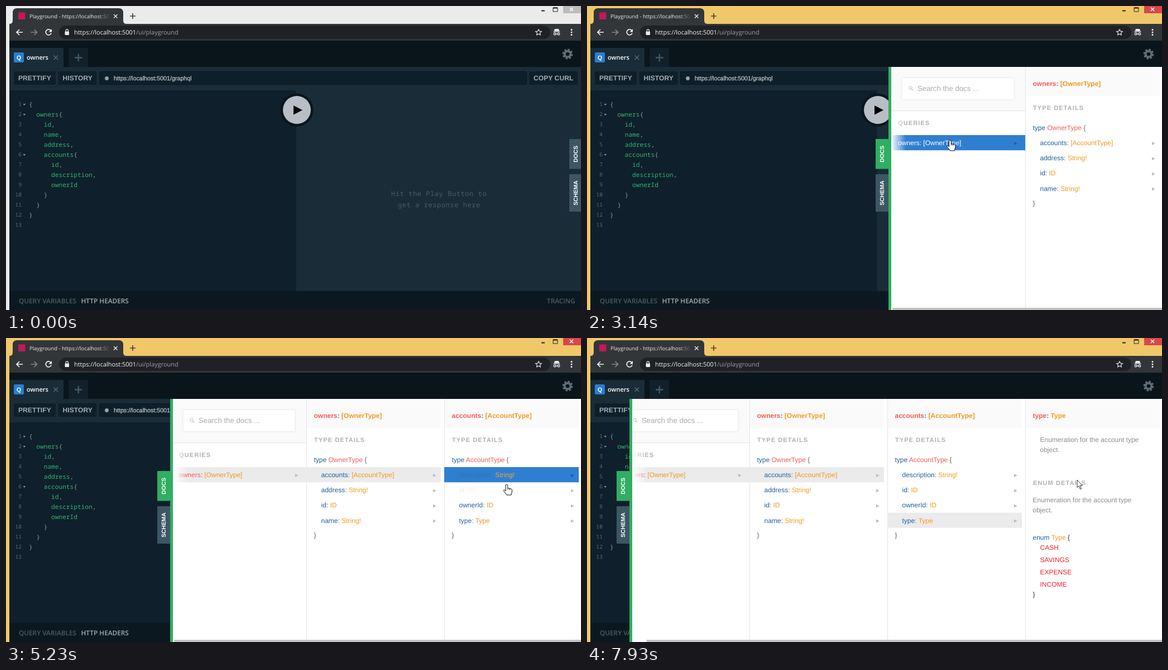
Write an HTML page that moves like this. It is 1030 px wide and 544 px high and loops after 8000 ms.

```html
<!DOCTYPE html>
<html lang="en">
<head>
<meta charset="utf-8">
<title>Playground</title>
<style>
  html, body { margin: 0; width: 100%; height: 100%; overflow: hidden; background: #0f1f2b; }
  svg { display: block; }
  text { font: 12px "Liberation Sans", Arial, sans-serif; white-space: pre; text-rendering: geometricPrecision; }
  .ui { font-family: "Open Sans", sans-serif; }
  .semi { font-weight: 600; }
  .bold { font-weight: 700; }
  .mono { font-family: "Noto Sans Mono", monospace; }
  .line { fill: none; stroke: #fff; stroke-width: 1.7; }
  .row { --w: 0%; }
  .row tspan { fill: color-mix(in srgb, #fff var(--w), var(--c)); }
</style>
</head>
<body>
<svg id="stage" width="1030" height="544" viewBox="0 0 1030 544"></svg>
<script>
const RED = '#f25c54', BLUE = '#1f61a0', ORANGE = '#f5981d', GRAY = '#666', GREEN = '#30ae62';
const OPEN_DOCS = 1600, OPEN_ACCOUNTS = 4680, OPEN_TYPE = 6610;

const rect = (x, y, w, h, fill, more = '') =>
  `<rect x="${x}" y="${y}" width="${w}" height="${h}" fill="${fill}" ${more}/>`;
const text = (x, y, s, fill, size = 12, cls = '', style = '') =>
  `<text x="${x}" y="${y}" fill="${fill}" class="${cls}" style="font-size:${size}px;${style}">${s}</text>`;
const path = (d, more = '') => `<path d="${d}" ${more}/>`;
const line = (d, color, width = 1.7) => path(d, `class="line" style="stroke:${color};stroke-width:${width}"`);
const span = (s, color) => `<tspan style="--c:${color}" fill="${color}">${s}</tspan>`;
const field = (name, type, color) => span(name, color) + span(': ', GRAY) + span(type, ORANGE);

function browser() {
  return rect(0, 0, 1030, 544, '#ebebeb', 'id="frame"') +
    rect(998, 0, 32, 13, '#bcbcbc', 'id="close"') +
    line('M1010 3l6 6m0-6l-6 6', '#fff', 1.5) + line('M959 8.5h6', '#222', 2) +
    path('M980 3h8v7h-8z', 'fill="none" stroke="#222"') + line('M980 3.5h8', '#222', 2) +
    path('M6 32Q12 32 12 26V12Q12 4 20 4H202Q210 4 210 12V26Q210 32 216 32Z', 'fill="#323639"') +
    rect(6, 32, 1024, 30, '#323639') + rect(22, 11.5, 12.5, 12.5, '#c2185b') +
    text(42, 21.5, 'Playground - https://localhost:50', '#e8eaed', 9.45, 'ui') +
    rect(165, 8, 22, 20, 'url(#tabFade)') +
    line('M193 15l6.5 6.5m0-6.5l-6.5 6.5', '#e8eaed', 1.4) + line('M222 18h10m-5-5v10', '#444', 1.7) +
    line('M30 47H19.500M24 42l-5 5 5 5', '#f1f3f4') + line('M44.500 47H55M50.500 42l5 5-5 5', '#85888c') +
    line('M80 43.500A5 5 0 1 0 81 48.500', '#f1f3f4') + path('M82 41v5.500h-5.500z', 'fill="#f1f3f4"') +
    rect(95, 35, 880, 24, '#202124', 'rx="12"') +
    rect(105.5, 45.5, 7.5, 6.5, '#e8eaed', 'rx="1"') + line('M107 46v-2a2.200 2.200 0 0 1 4.400 0v2', '#e8eaed', 1.2) +
    text(122, 51, 'https://localhost:5001<tspan fill="#9aa0a6">/ui/playground</tspan>', '#f1f3f4', 10.95, 'ui') +
    line('M954 41.800l1.600 3.400 3.700.400-2.800 2.500.800 3.700-3.300-1.900-3.300 1.900.800-3.700-2.800-2.500 3.700-.400z', '#dfe1e5', 1.2) +
    path('M983 41h7l1.500 4h-10zM980.500 45.500h12v1.200h-12z', 'fill="#e8eaed"') +
    line('M988 50h-3M984.800 50a1.800 1.800 0 1 1-3.600 0 1.800 1.800 0 1 1 3.600 0M991.800 50a1.800 1.800 0 1 1-3.600 0 1.800 1.800 0 1 1 3.600 0', '#e8eaed', 1.3) +
    [42.5, 47, 51.5].map(y => `<circle cx="1013" cy="${y}" r="1.5" fill="#f1f3f4"/>`).join('');
}

function button(x, w, label) {
  return rect(x, 117, w, 24, '#0f1f2a', 'rx="2"') +
    text(x + 8, 133, label, '#a3adb3', 12, 'bold', 'letter-spacing:.1px');
}

function editor() {
  const code = ['{', '  owners{', '    id,', '    name,', '    address,', '    accounts{', '      id,',
    '      description,', '      ownerId', '    }', '  }', '}', ''];
  const lines = code.map((s, i) => {
    const y = 180 + 18 * i;
    const colored = s.replace(/[{},]/g, '<tspan fill="#8a979f">$&</tspan>');
    return text(28, y - 1, i + 1, '#5a6a75', 9.6, 'mono', 'text-anchor:end') +
      (/owners|accounts|^{/.test(s) ? path(`M30.500 ${y - 5}h4.600l-2.300 3z`, 'fill="#8a979f"') : '') +
      text(41, y, colored, '#2bb673', 11.15, 'mono');
  }).join('');
  return rect(6, 62, 1024, 47, '#0a151b') + rect(6, 75, 97, 34, '#1a2c38') + rect(112, 75, 35, 34, '#11202a') +
    rect(14, 83, 18, 18, '#2a7ed3', 'rx="2"') + text(19, 96, 'Q', '#fff', 10.5, 'bold') +
    text(37, 96, 'owners', '#fff', 11, 'ui semi') +
    line('M85.500 88.500l7.500 7.500m0-7.500l-7.500 7.500', '#5c6a73', 1.4) + line('M123 92.500h13.500m-6.750-6.750v13.500', '#465862', 2.4) +
    '<g fill="none" stroke="#5f6c74"><circle cx="1006" cy="86" r="5.300" stroke-width="4"/>' +
    '<circle cx="1006" cy="86" r="8" stroke-width="3" stroke-dasharray="3.500 2.783"/></g>' +
    rect(6, 109, 1024, 42, '#1a2c38') + button(14, 75, 'PRETTIFY') + button(93.5, 69, 'HISTORY') +
    rect(167.5, 117.5, 765, 23, '#0f1f2a', 'rx="2" stroke="#0a161e"') + button(937, 87, 'COPY CURL') +
    '<circle id="pulse" cx="180.500" cy="129.500" fill="#97a3aa"/><circle cx="180.500" cy="129.500" r="3.400" fill="#97a3aa"/>' +
    text(193, 133, 'https://localhost:5001/graphql', '#b4bcc1', 10.7, '', 'stroke:#b4bcc1;stroke-width:.3px') +
    rect(6, 151, 514, 359, '#0f1f2b') + rect(519.5, 151, 511, 359, '#1a2c38') + lines +
    text(690, 340, 'Hit the Play Button to', '#4a5b66', 12, 'mono', 'letter-spacing:.58px') +
    text(702, 360, 'get a response here', '#4a5b66', 12, 'mono', 'letter-spacing:.58px') +
    rect(6, 510, 1024, 34, '#0b1820') +
    text(23, 532, 'QUERY VARIABLES', '#4d5b64', 11.8, 'ui semi') +
    text(134.5, 532, 'HTTP HEADERS', '#a3acb1', 11.8, 'ui semi') +
    text(969, 532, 'TRACING', '#4d5b64', 11.8, 'ui semi') +
    '<circle cx="521" cy="186" r="29.500" fill="#0a151c"/><circle cx="521" cy="186" r="25" fill="#b8bec5"/>' +
    path('M515 178v16.500l16-8.250z', 'fill="#000"');
}

const label = (x, y, s) => text(x, y, s, '#b0b0b0', 11, 'bold', 'letter-spacing:1.1px');

function row(i, name, type, inset = 26.5, color = BLUE, width = 241) {
  const y = 231 + 27.2 * i;
  return `<g class="row" data-name="${name}">` + rect(0, y, width, 27.2, 'none') +
    text(inset, y + 18, field(name, type, color), GRAY) +
    path(`M233 ${y + 12}l5.500 3-5.500 3z`, 'fill="#bcbcbc" transform="translate(-6)"') + '</g>';
}

const header = (name, type) => rect(0, 109, 241, 52, '#fafafa') + rect(0, 109, 1, 435, '#e4e4e4') +
  text(13.5, 143, field(name, type, RED), GRAY, 12, 'bold');

function typeColumn(name, type, typeName, fields) {
  return header(name, type) + label(14, 186, 'TYPE DETAILS') +
    text(13.5, 221.5, span('type ', BLUE) + span(typeName, RED) + ' {', GRAY) +
    fields.map(([n, t], i) => row(i, n, t)).join('') + text(13.5, 357, '}', GRAY);
}

const columns = [
  rect(0, 109, 247, 78, '#fafafa') + rect(0, 187, 247, 1, '#e2e2e2') +
    rect(26.5, 129, 200, 38, '#fff', 'style="filter:drop-shadow(0 0 1.5px #0002)"') +
    '<circle cx="41.500" cy="146.500" r="2.600" fill="none" stroke="#bbb"/>' + line('M43.500 148.500l2.500 2.500', '#bbb', 1.2) +
    text(54, 152, 'Search the docs ...', '#aaa', 13.2) + label(19, 213, 'QUERIES') +
    row(0, 'owners', '[OwnerType]', 19, RED, 247),
  typeColumn('owners', '[OwnerType]', 'OwnerType',
    [['accounts', '[AccountType]'], ['address', 'String!'], ['id', 'ID'], ['name', 'String!']]),
  typeColumn('accounts', '[AccountType]', 'AccountType',
    [['description', 'String!'], ['id', 'ID'], ['ownerId', 'ID'], ['type', 'Type']]),
  header('type', 'Type') +
    [[26.5, 186], [13.5, 294]].map(([x, y]) => text(x, y, 'Enumeration for the account type', '#8c8c8c') +
      text(x, y + 17.5, 'object.', '#8c8c8c')).join('') +
    label(14, 263, 'ENUM DETAILS') +
    text(13.5, 361, span('enum ', BLUE) + span('Type', ORANGE) + ' {', '#333') +
    ['CASH', 'SAVINGS', 'EXPENSE', 'INCOME'].map((s, i) => text(26.5, 378.5 + 22.1 * i, s, '#e8242c')).join('') +
    text(13.5, 463, '}', '#333')
];

const sideTab = (y, h, s, id) => rect(-23, y, 23, h, '#3d5664', `id="${id}"`) +
  `<g transform="translate(-8 ${y + h / 2}) rotate(-90)">` + text(0, 0, s, '#fff', 10.3, 'bold', 'text-anchor:middle') + '</g>';

const stage = document.getElementById('stage');
stage.innerHTML = `<defs>
  <linearGradient id="tabFade"><stop stop-color="#323639" stop-opacity="0"/><stop offset="1" stop-color="#323639"/></linearGradient>
  <linearGradient id="edgeFade"><stop stop-color="#fff"/><stop offset="1" stop-color="#fff" stop-opacity="0"/></linearGradient>
  <clipPath id="panelClip"><rect id="clip" y="109" width="1030" height="435"/></clipPath></defs>` +
  browser() + editor() +
  '<g id="panel" clip-path="url(#panelClip)">' + rect(0, 109, 1030, 435, '#fff') +
  columns.map(c => `<g class="column">${c}</g>`).join('') +
  rect(0, 188, 26, 356, 'url(#edgeFade)', 'id="edge"') + rect(0, 540, 1030, 4, '#c2c2c2', 'id="bar"') + '</g>' +
  '<g id="side">' + sideTab(238, 53.5, 'DOCS', 'docs') + sideTab(301, 67, 'SCHEMA', 'schema') + rect(0, 109, 5, 435, GREEN) + '</g>' +
  '<g id="cursor"><circle id="click" r="10" fill="#b4b41a" fill-opacity=".92"/><g stroke="#111" stroke-linejoin="round" fill="#fff">' +
  path('M-1.800 1Q0-1 1.800 1V6.500L8 8Q10 9 9.600 12L8 19H0L-5.500 11.500Q-5.500 9-3.600 10L-1.800 12ZM2 6.500v3M5 7.300v2.500', 'id="hand"') +
  path('M0 0V13.500L3 10.700 5.500 16.500 7.600 15.600 5.200 10H9.300Z', 'id="arrow" stroke-width=".9"') + '</g></g>';

const $ = Object.fromEntries([...stage.querySelectorAll('[id]')].map(e => [e.id, e]));
const columnNodes = [...stage.querySelectorAll('.column')];
const show = (node, on) => node.setAttribute('visibility', on ? 'visible' : 'hidden');
const move = (node, x, y = 0) => node.setAttribute('transform', `translate(${x} ${y})`);
const within = (t, a, b) => t >= a && t < b;

// time, x, y of the pointer tip
const route = [[200, 935, 548], [980, 995, 264], [1360, 1018, 266], [1980, 1018, 266], [2450, 874, 257],
  [2760, 872, 243], [3150, 650, 240], [3380, 750, 214], [3610, 868, 242], [3910, 878, 256], [4450, 904, 255],
  [4830, 897, 262], [5230, 897, 262], [5400, 899, 252], [5840, 882, 333], [6000, 880, 325], [6690, 878, 324],
  [7390, 878, 324], [7650, 812, 298], [7930, 878, 254], [8000, 878, 254]];
// start, end, column and field under the pointer
const hovers = [[OPEN_DOCS, 2500, 1, 'address'], [2500, 2900, 1, 'accounts'], [3020, 3320, 0, 'owners'],
  [3500, OPEN_ACCOUNTS, 1, 'accounts'], [OPEN_ACCOUNTS, 5220, 2, 'id'], [5220, 5500, 2, 'description'],
  [5500, 5600, 2, 'id'], [5600, 5700, 2, 'ownerId'], [5700, OPEN_TYPE, 2, 'type']];
const selected = { 0: ['owners', OPEN_DOCS], 1: ['accounts', OPEN_ACCOUNTS], 2: ['type', 6770] };
const clicks = [[1520, OPEN_DOCS], [4530, OPEN_ACCOUNTS], [6450, OPEN_TYPE]];

function pointer(t) {
  const i = Math.max(1, route.findIndex(p => p[0] > t));
  const [a, b] = [route[i - 1], route[i]];
  const u = Math.max(0, (t - a[0]) / (b[0] - a[0])), e = u * u * (3 - 2 * u);
  return [a[1] + (b[1] - a[1]) * e, a[2] + (b[2] - a[2]) * e];
}

function drawRow(node, column, t) {
  const name = node.dataset.name;
  let blue = false, white = 0;
  for (const [start, end, c, field] of hovers) {
    if (c !== column || field !== name) continue;
    if (within(t, start, end)) { blue = true; white = Math.min(1, (t - start) / 100); }
    else if (t >= end) white = Math.max(white, 1 - (t - end) / 100);
  }
  const [pick, since] = selected[column];
  const gray = pick === name && t >= since;
  node.style.setProperty('--w', Math.max(0, white) * 100 + '%');
  node.firstChild.setAttribute('fill', blue ? '#2f7fd0' : gray ? '#ebebeb' : 'none');
  node.lastChild.setAttribute('fill', blue ? '#1f5f9f' : '#bcbcbc');
}

function draw(t) {
  const active = t >= 1520, open = t >= OPEN_DOCS;
  $.frame.setAttribute('fill', active ? '#f0c869' : '#ebebeb');
  $.close.setAttribute('fill', active ? '#d9474b' : '#bcbcbc');

  const p = Math.min(1, ((t + 1750) % 2000) / 550);
  $.pulse.setAttribute('r', 3.5 + 5 * (1 - (1 - p) ** 2));
  $.pulse.setAttribute('opacity', .7 * (1 - p));

  const count = t < OPEN_ACCOUNTS ? 2 : t < OPEN_TYPE ? 3 : 4;
  const left = open ? [545, 299, 81][count - 2] : 1037;
  $.clip.setAttribute('x', left);
  $.edge.setAttribute('x', left);
  $.bar.setAttribute('x', left + (count === 4 ? 26 : 2));
  move($.side, left - 5);
  $.docs.setAttribute('fill', open ? GREEN : '#3d5664');
  columnNodes.forEach((node, i) => {
    show(node, i < count);
    move(node, 785 - 247 * (count - 1 - i));
    node.querySelectorAll('.row').forEach(r => drawRow(r, i, t));
  });

  const [x, y] = pointer(t);
  const hand = within(t, 1240, 2880) || within(t, 3020, 3320) || within(t, 3500, OPEN_TYPE);
  move($.cursor, x, y);
  show($.hand, hand);
  show($.arrow, !hand && t >= 210);
  show($.click, clicks.some(([a, b]) => within(t, a, b)));
}

const began = performance.now();
function tick() {
  draw((performance.now() - began) % 8000);
  requestAnimationFrame(tick);
}
tick();
</script>
</body>
</html>
```
